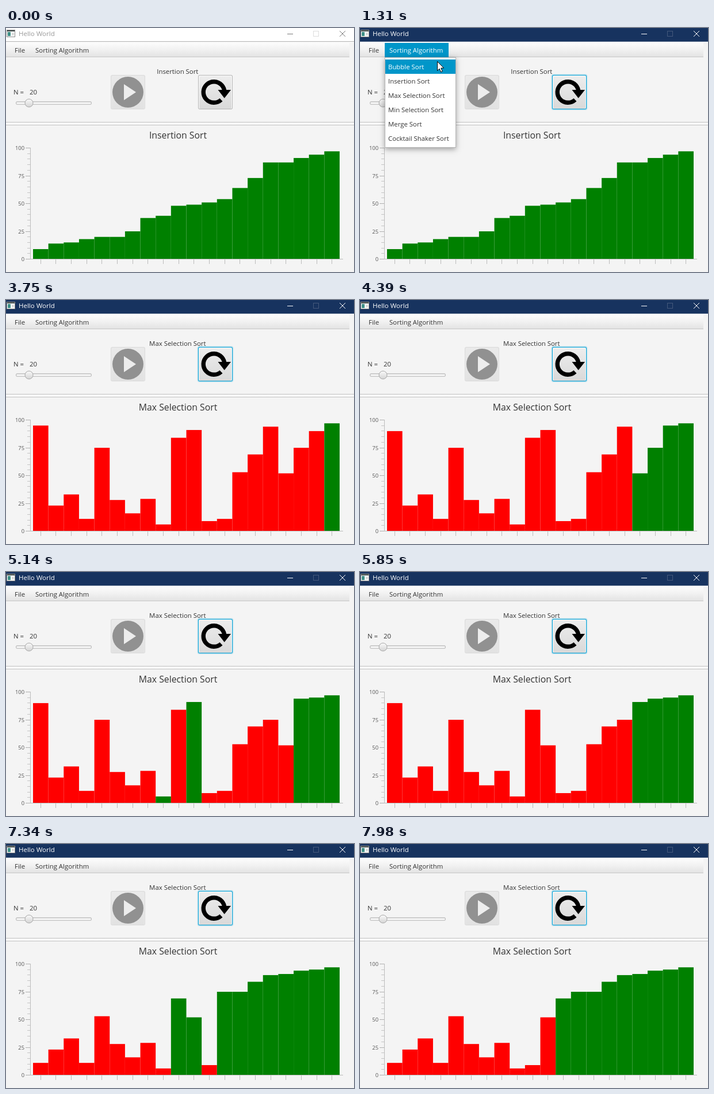
Write an HTML page with a canvas that moves like this. It is 605 px wide and 426 px high and loops after 8 s.

```html
<!DOCTYPE html>
<html lang="en">
<head>
<meta charset="utf-8">
<title>Sorting</title>
<style>
html, body { margin: 0; width: 100%; height: 100%; overflow: hidden; background: #f4f4f4; }
canvas { display: block; }
</style>
</head>
<body>
<canvas id="stage" width="605" height="426"></canvas>
<script>
const ctx = document.getElementById('stage').getContext('2d');
const LOOP = 8000;
const FONT = '"Open Sans", "Noto Sans", sans-serif';
const GREEN = '#008000', RED = '#ff0000', BLUE = '#0096c9', INK = '#333333';

const SORTED = [9, 14, 15, 18, 20, 20, 25, 37, 39, 48, 49, 51, 54, 64, 73, 87, 87, 91, 94, 97];
const SHUFFLED = [95, 23, 33, 11, 75, 28, 16, 29, 6, 97, 91, 9, 11, 53, 69, 94, 52, 75, 90, 84];
const ITEMS = ['Bubble Sort', 'Insertion Sort', 'Max Selection Sort',
  'Min Selection Sort', 'Merge Sort', 'Cocktail Shaker Sort'];

// Moments of the interaction, in ms
const HOVER = 820, OPEN = 890, CHOOSE = 1960, RESET = 1990, PLAY = 3000;
// Pass k runs from PASSES[k] to PASSES[k + 1] and ends with a swap
const PASSES = [3140, 3740, 4290, 4860, 5400, 5930, 6380, 6810, 7230, 7622, 8060];
const LEAD = 85, TAIL = 80;

// Pointer: time, x, y
const PATH = [
  [60, 505, 424], [450, 310, 210], [860, 128, 38], [1050, 130, 39], [1310, 134, 58],
  [1680, 117, 118], [2210, 116, 118], [2450, 180, 125], [2700, 236, 118],
  [3000, 236, 118], [3080, 236, 114], [3250, 236, 114], [3650, 587, 215]
];

function rect(x, y, w, h, fill) {
  ctx.fillStyle = fill;
  ctx.fillRect(x, y, w, h);
}

function round(x, y, w, h, r, fill) {
  ctx.beginPath();
  ctx.roundRect(x, y, w, h, r);
  ctx.fillStyle = fill;
  ctx.fill();
}

function poly(points, fill) {
  ctx.beginPath();
  points.forEach(([x, y]) => ctx.lineTo(x, y));
  ctx.closePath();
  ctx.fillStyle = fill;
  ctx.fill();
}

function line(x1, y1, x2, y2, color) {
  ctx.beginPath();
  ctx.moveTo(x1, y1);
  ctx.lineTo(x2, y2);
  ctx.strokeStyle = color;
  ctx.lineWidth = 1;
  ctx.stroke();
}

function text(str, x, y, size = 11.4, color = INK, align = 'left') {
  ctx.font = `${size}px ${FONT}`;
  ctx.textAlign = align;
  ctx.fillStyle = color;
  ctx.fillText(str, x, y);
}

function shade(y1, y2, ...colors) {
  const g = ctx.createLinearGradient(0, y1, 0, y2);
  colors.forEach((c, i) => g.addColorStop(i / (colors.length - 1), c));
  return g;
}

function pointerAt(t) {
  const last = PATH.length - 1;
  if (t < PATH[0][0] || t >= PATH[last][0]) return null;
  const k = PATH.findIndex(p => p[0] > t);
  const [t0, x0, y0] = PATH[k - 1], [t1, x1, y1] = PATH[k];
  const f = (t - t0) / (t1 - t0);
  return { x: Math.round(x0 + (x1 - x0) * f), y: Math.round(y0 + (y1 - y0) * f) };
}

// Values and highlighted bars of the selection sort at time t
function sortAt(t) {
  if (t < RESET) return { values: SORTED, isGreen: () => true };
  const values = SHUFFLED.slice();
  let end = values.length - 1, pair = [];
  for (let k = 0; k < PASSES.length - 1 && t >= PASSES[k]; k++) {
    const from = PASSES[k] + LEAD, to = PASSES[k + 1] - TAIL;
    const done = t >= PASSES[k + 1];
    const steps = end - 1;
    const seen = Math.floor((t - from) / (to - from) * steps);
    const low = done ? 0 : Math.max(1, end - 1 - seen);
    let max = end;
    for (let j = end - 1; j >= low; j--) {
      if (!done && j === low && t >= from && t < to) pair = [max, j];
      if (values[j] > values[max]) max = j;
    }
    if (!done) break;
    [values[max], values[end]] = [values[end], values[max]];
    end--;
  }
  return { values, isGreen: i => i > end || pair.includes(i) };
}

function drawTitleBar(active) {
  rect(0, 0, 605, 24, active ? '#17335f' : '#ffffff');
  rect(0, 23, 605, 1, active ? '#3d5478' : '#b4b4b4');
  rect(1, 3, 15, 13, '#8b8b8b');
  rect(2, 4, 13, 2, '#3f4a4a');
  rect(2, 6, 13, 9, '#ffffff');
  rect(3, 7, 5, 7, '#3f8f86');
  rect(10, 8, 4, 5, '#dcdcdc');
  const ink = active ? '#ffffff' : '#999999';
  text('Hello World', 22, 14, 11.5, ink);
  line(489, 10.5, 499, 10.5, active ? '#ffffff' : '#777777');
  ctx.strokeStyle = active ? '#45597c' : '#dddddd';
  ctx.strokeRect(534.5, 5.5, 9, 9);
  line(580, 5, 590, 15, active ? '#ffffff' : '#777777');
  line(590, 5, 580, 15, active ? '#ffffff' : '#777777');
}

function drawMenuBar(hover) {
  rect(0, 24, 605, 2, '#f8f8f8');
  rect(0, 26, 597, 24, shade(26, 50, '#fcfcfc', '#f1f1f1', '#e3e3e3'));
  rect(0, 50, 597, 1, '#c6c6c6');
  if (hover) rect(43, 26, 111, 25, BLUE);
  text('File', 15, 43);
  text('Sorting Algorithm', 51, 43, 11.4, hover ? '#ffffff' : INK);
}

function drawButton(x, focus, faded) {
  ctx.save();
  if (faded) ctx.globalAlpha = 0.4;
  if (focus) {
    round(x - 1.4, 80.6, 62.8, 62.8, 4, 'rgba(3,158,211,.25)');
    round(x, 82, 60, 60, 3, '#039ed3');
  } else {
    round(x, 82, 60, 60, 3, '#b5b5b5');
  }
  round(x + 1, 83, 58, 58, 2, '#fbfbfb');
  round(x + 2, 84, 56, 57, 2, shade(84, 141, '#ededed', '#d9d9d9'));
  ctx.restore();
}

function drawControls(t, active, label) {
  text(label, 298.3, 80, 11.4, INK, 'center');
  text('N =', 13, 116);
  text('20', 41, 116);

  round(17, 128, 132, 6, 3, '#b9b9b9');
  round(18, 129, 130, 4, 2, shade(129, 133, '#e6e6e6', '#fafafa'));
  ctx.beginPath();
  ctx.arc(40, 131, 7, 0, 7);
  ctx.fillStyle = shade(124, 138, '#fafafa', '#d4d4d4');
  ctx.fill();
  ctx.strokeStyle = '#a6a6a6';
  ctx.lineWidth = 1;
  ctx.stroke();

  const ready = t >= RESET && t < PLAY;
  drawButton(182, false, !ready);
  ctx.beginPath();
  ctx.arc(212, 112, 27, 0, 7);
  ctx.fillStyle = ready ? '#000000' : '#919191';
  ctx.fill();
  poly([[205, 98], [226, 112], [205, 126]], ready ? '#e3e3e3' : '#ededed');

  drawButton(334, active, false);
  ctx.beginPath();
  ctx.arc(361.5, 112, 18.3, 0.82, Math.PI * 2);
  ctx.strokeStyle = '#000000';
  ctx.lineWidth = 7.4;
  ctx.stroke();
  poly([[368.5, 108], [391, 108], [379.7, 122.5]], '#000000');
}

function drawDivider() {
  rect(0, 164, 605, 6, shade(164, 170, '#ececec', '#ffffff', '#ececec'));
  rect(0, 164, 605, 1, '#c4c4c4');
  rect(0, 169, 605, 1, '#c4c4c4');
}

function drawChart(t, label) {
  text(label, 299, 193, 15.8, INK, 'center');
  const base = 403.5, unit = 1.94, step = 26.65, left = 47;
  const { values, isGreen } = sortAt(t);
  values.forEach((v, i) => {
    const h = v * unit;
    rect(left + i * step, base - h, step, h, isGreen(i) ? GREEN : RED);
  });
  for (let v = 0; v <= 100; v += 5) {
    const y = Math.floor(base - v * unit) + 0.5;
    const major = v % 25 === 0;
    line(major ? 34 : 37, y, 42, y, major ? '#b0b0b0' : '#c4c4c4');
    if (major) text(v, 32, y + 3.5, 9.4, '#555555', 'right');
  }
  line(42.5, 209, 42.5, 404, '#bcbcbc');
  line(42, 403.5, 586, 403.5, '#bcbcbc');
  for (let i = 0; i < values.length; i++) {
    const x = Math.floor(left + (i + 0.5) * step) + 0.5;
    line(x, 404, x, 412, '#bcbcbc');
  }
}

function drawPopup(p) {
  ctx.save();
  ctx.shadowColor = 'rgba(0,0,0,.35)';
  ctx.shadowBlur = 9;
  ctx.shadowOffsetY = 3;
  rect(43, 51, 124, 158, '#b5b5b5');
  ctx.restore();
  rect(44, 52, 122, 156, '#ffffff');
  const chosen = Math.floor((p.y - 55) / 25);
  ITEMS.forEach((name, i) => {
    if (i === chosen) rect(44, 55 + i * 25, 122, 25, BLUE);
    text(name, 49, 72 + i * 25, 11.4, i === chosen ? '#ffffff' : INK);
  });
}

function drawPointer({ x, y }) {
  ctx.save();
  ctx.translate(x + 0.5, y + 0.5);
  poly([[0, 0], [0, 16], [3.6, 12.6], [6.2, 18.4], [8.8, 17.2], [6.3, 11.6], [11.2, 11.4]], '#ffffff');
  ctx.strokeStyle = '#000000';
  ctx.lineWidth = 1;
  ctx.stroke();
  ctx.restore();
}

function draw(t) {
  const active = t >= OPEN;
  const label = t < RESET ? ITEMS[1] : ITEMS[2];
  const p = pointerAt(t);
  rect(0, 0, 605, 426, '#f4f4f4');
  drawTitleBar(active);
  drawMenuBar(t >= HOVER && t < CHOOSE);
  drawControls(t, active, label);
  drawDivider();
  drawChart(t, label);
  if (t >= OPEN && t < CHOOSE) drawPopup(p);
  if (p) drawPointer(p);
}

const start = performance.now();
function tick() {
  draw((performance.now() - start) % LOOP);
  requestAnimationFrame(tick);
}
tick();
</script>
</body>
</html>
```
